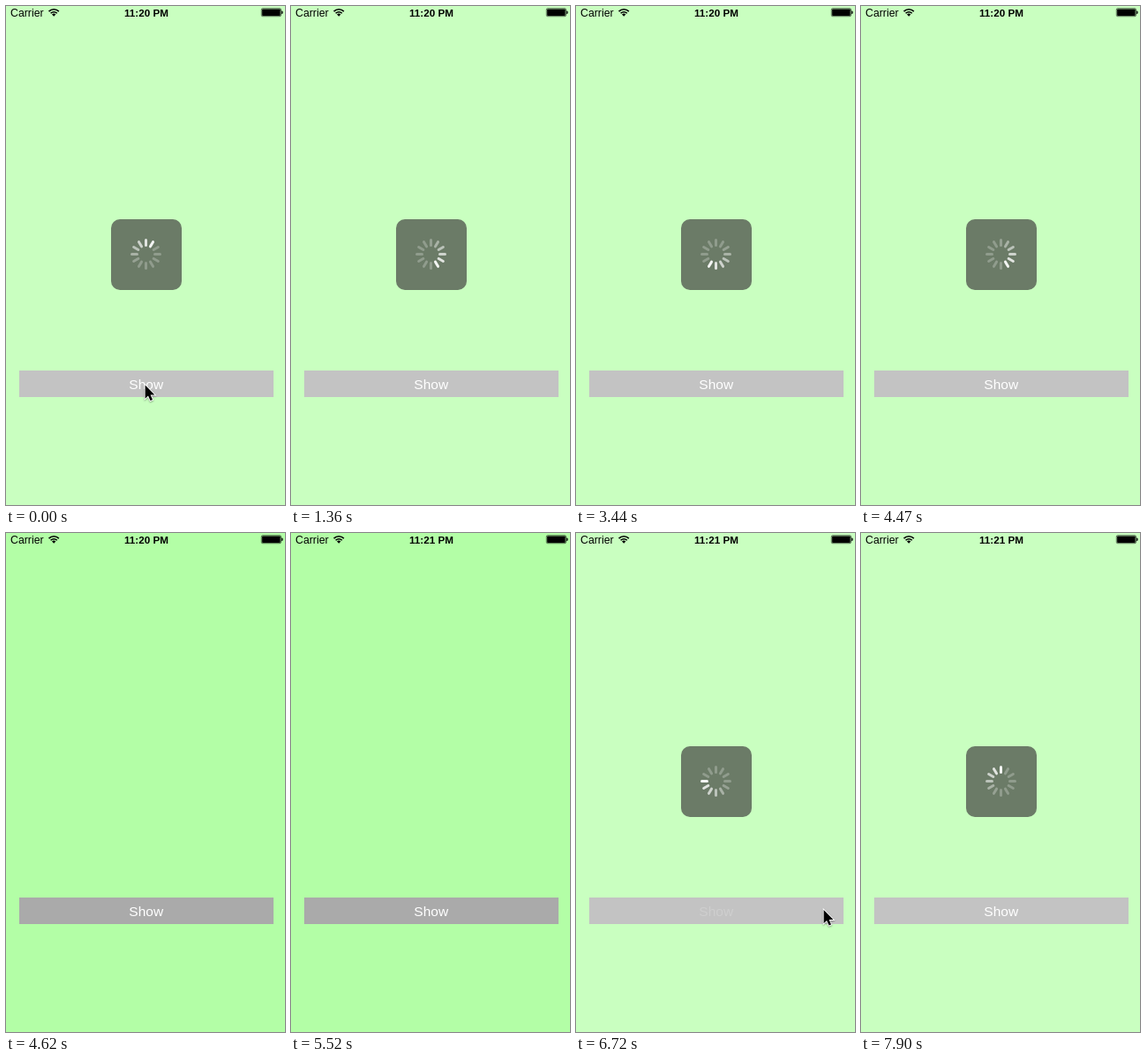
An HTML page with a canvas for the animation above (8 s loop, 316 by 564 pixels).

```html
<!DOCTYPE html>
<html lang="en">
<head>
<meta charset="utf-8">
<title>Loading overlay</title>
<style>
  html, body { margin: 0; width: 316px; height: 564px; overflow: hidden; background: #b3fea6; }
  canvas { display: block; }
</style>
</head>
<body>
<canvas id="stage" width="316" height="564"></canvas>
<script>
const ctx = document.getElementById('stage').getContext('2d');
const W = 316, H = 564, LOOP = 8000;
const FONT = '"Liberation Sans", Arial, sans-serif';
const HIDE = 4620, CLOCK = 5520, PRESS = 6570, SHOW = 6720, RELEASE = 6870;

// Cursor stops: [time, x, y]; no position means hidden.
const cursorStops = [
  [0, 157, 427.5], [470, 285, 522], [620],
  [5820, 303, 425], [5970, 289, 425], [6120, 280, 425],
  [7170, 288, 500], [7320]
];

function text(str, x, y, font, color, align = 'left') {
  ctx.font = font + ' ' + FONT;
  ctx.fillStyle = color;
  ctx.textAlign = align;
  ctx.fillText(str, x, y);
}

function box(x, y, w, h, r, color) {
  ctx.fillStyle = color;
  ctx.beginPath();
  ctx.roundRect(x, y, w, h, r);
  ctx.fill();
}

function wifi(x, y) {
  const from = -Math.PI * 0.75, to = -Math.PI * 0.25;
  ctx.strokeStyle = ctx.fillStyle = '#000';
  ctx.lineCap = 'butt';
  ctx.lineWidth = 1.6;
  for (const r of [8, 5.1]) {
    ctx.beginPath();
    ctx.arc(x, y, r, from, to);
    ctx.stroke();
  }
  ctx.beginPath();
  ctx.moveTo(x, y);
  ctx.arc(x, y, 3.1, from, to);
  ctx.fill();
}

function battery() {
  ctx.strokeStyle = '#000';
  ctx.lineWidth = 0.6;
  ctx.beginPath();
  ctx.roundRect(289.3, 2.8, 22.2, 8.9, 1.4);
  ctx.stroke();
  box(290.1, 3.6, 20.6, 7.3, 0.7, '#000');
  box(312.2, 5.6, 1.4, 3.3, [0, 1.2, 1.2, 0], '#000');
}

function statusBar(t) {
  text('Carrier', 5, 11.5, '12.3px', '#000');
  wifi(54.2, 11.8);
  text(t < CLOCK ? '11:20 PM' : '11:21 PM', 159, 11.5, 'bold 11.7px', '#000', 'center');
  battery();
}

function spinnerHead(t) {
  const k = Math.max(0, Math.floor((t - 12) / 148.63));
  const s = k ? (12 + k * 148.63) / 1000 : 0;
  return Math.floor(t < SHOW ? 1.25 + 12.2 * s : 9.7 + 12.2 * (s - 6.7));
}

function spinner(t) {
  const head = spinnerHead(t) % 12;
  ctx.lineCap = 'round';
  ctx.lineWidth = 3;
  for (let i = 0; i < 12; i++) {
    const age = (head - i + 12) % 12;
    const a = i * Math.PI / 6;
    const dx = Math.sin(a), dy = -Math.cos(a);
    ctx.strokeStyle = `rgba(255,255,255,${Math.max(0.25, 0.92 - age * 0.125)})`;
    ctx.beginPath();
    ctx.moveTo(158.5 + dx * 10, 280.5 + dy * 10);
    ctx.lineTo(158.5 + dx * 16, 280.5 + dy * 16);
    ctx.stroke();
  }
}

function cursor(t) {
  const [, x, y] = cursorStops.filter(s => s[0] <= t).pop();
  if (x === undefined) return;
  const outline = [[0, 0], [0, 15.2], [3.4, 12], [5.9, 17.6], [8.4, 16.5], [6, 11], [10.8, 11]];
  ctx.save();
  ctx.translate(x + 0.6, y + 1);
  ctx.beginPath();
  outline.forEach(p => ctx.lineTo(...p));
  ctx.closePath();
  ctx.lineJoin = 'miter';
  ctx.lineWidth = 1.8;
  ctx.strokeStyle = '#fff';
  ctx.shadowColor = 'rgba(0,0,0,0.35)';
  ctx.shadowBlur = 2;
  ctx.shadowOffsetY = 1;
  ctx.stroke();
  ctx.shadowColor = 'transparent';
  ctx.fillStyle = '#000';
  ctx.fill();
  ctx.restore();
}

function draw(t) {
  const loading = t < HIDE || t >= SHOW;
  const pressed = t >= PRESS && t < RELEASE;
  ctx.fillStyle = '#b3fea6';
  ctx.fillRect(0, 0, W, H);
  box(15, 412, 288, 30, 0, '#aaaaaa');
  text('Show', 158.7, 432.8, '15.5px', pressed ? '#bababa' : '#fff', 'center');
  if (loading) {
    ctx.fillStyle = 'rgba(255,255,255,0.29)';
    ctx.fillRect(0, 0, W, H);
    box(119, 241, 80, 80, 10, '#6b7b67');
    spinner(t);
  }
  statusBar(t);
  cursor(t);
}

let start;
function tick(now) {
  start ??= now;
  draw((now - start) % LOOP);
  requestAnimationFrame(tick);
}
draw(0);
requestAnimationFrame(tick);
</script>
</body>
</html>
```
